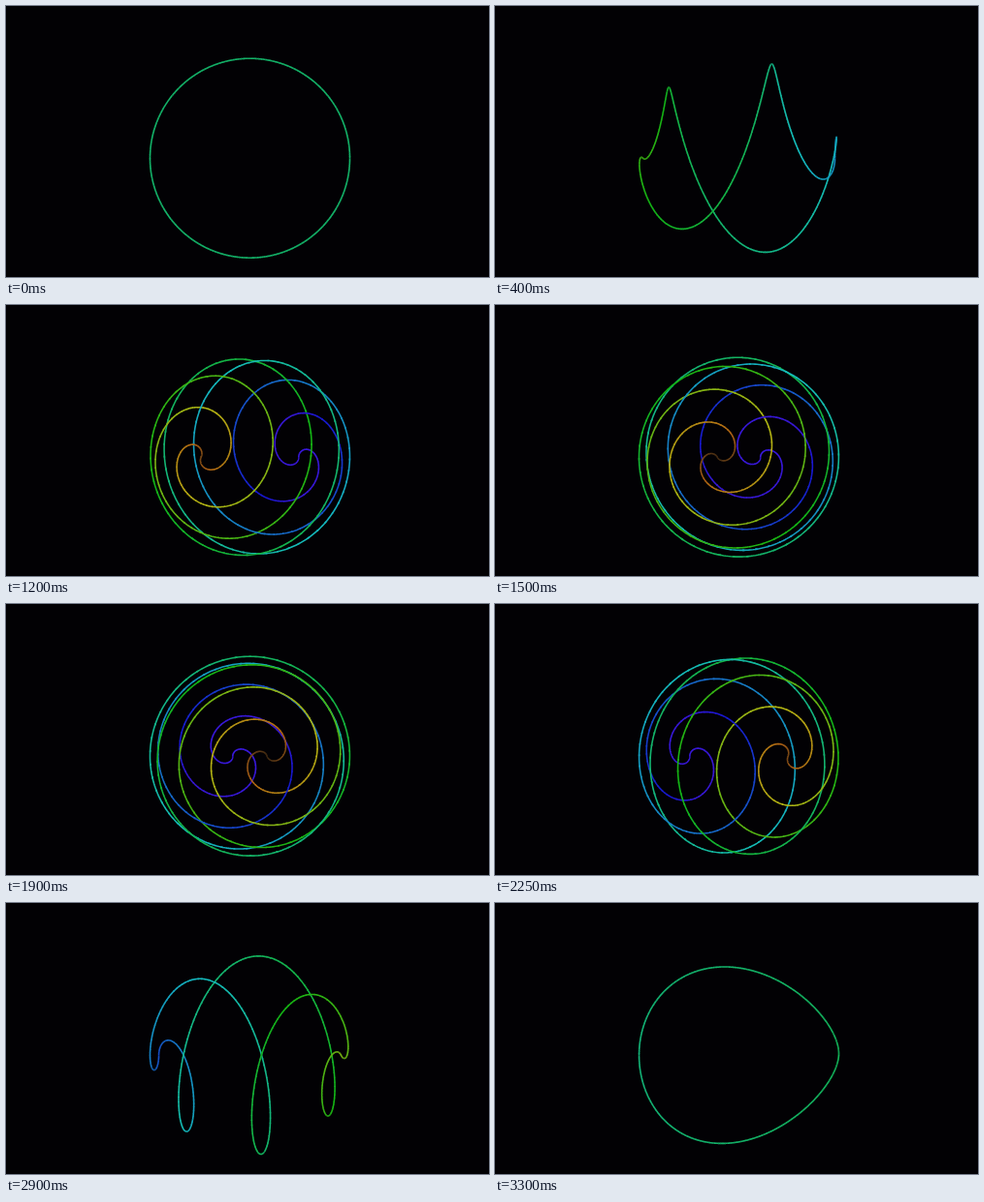
Write an HTML page with a canvas that moves like this. It is 498 by 280 pixels and loops after 3350 ms.

```html
<!DOCTYPE html>
<html lang="en">
<head>
<meta charset="utf-8">
<title>Twisting ring</title>
<style>
  html, body { margin: 0; width: 100%; height: 100%; overflow: hidden; background: #020104; }
  canvas { display: block; width: 498px; height: 280px; }
</style>
</head>
<body>
<canvas id="stage" width="498" height="280"></canvas>
<script>
const ctx = document.getElementById('stage').getContext('2d');

const LOOP = 3350, STEP = 50;
const START = 113, SPAN = 3220;      // the turn begins after a short hold
const CX = 251.5, CY = 157.2, R = 103;
const MAX_TWIST = 8;
const CHUNKS = 180, PARTS = 6;

const clamp = (x, lo, hi) => Math.min(hi, Math.max(lo, x));

// Spectrum along the spiral, h from -1 (orange, fading out) to 1 (indigo)
function colour(h) {
  const hue = clamp(152 + 150 * h, 30, 250);
  const fade = clamp((1.1 + h) / 0.3, 0, 1);
  const light = (39 + 10 * Math.max(0, h)) * fade;
  return `hsl(${hue}, ${40 + 40 * fade}%, ${light}%)`;
}

// One half of a ring, twisted about its axis and then turned by `turn`
function point(v, side, twist, turn) {
  const r = side * Math.sin(v);
  const x = Math.cos(v) * Math.cos(turn) + r * Math.sin(twist * v) * Math.sin(turn);
  return [CX + R * x, CY - R * r * Math.cos(twist * v)];
}

function draw(time) {
  const p = clamp((time - START) / SPAN, 0, 1);
  const twist = MAX_TWIST * 4 * p * (1 - p);
  const turn = Math.PI * p;

  ctx.fillStyle = '#020104';
  ctx.fillRect(0, 0, 498, 280);
  ctx.lineWidth = 1.6;
  ctx.lineJoin = 'round';

  for (const side of [1, -1]) {
    for (let c = 0; c < CHUNKS; c++) {
      ctx.strokeStyle = colour(twist / MAX_TWIST * (1 - 2 * (c + 0.5) / CHUNKS));
      ctx.beginPath();
      // One extra part overlaps the next chunk and hides the seam
      for (let k = 0; k <= PARTS + 1; k++) {
        const v = Math.PI * (c + k / PARTS) / CHUNKS;
        ctx.lineTo(...point(v, side, twist, turn));
      }
      ctx.stroke();
    }
  }
}

const origin = performance.now();
let last = -1;

function tick() {
  const t = Math.max(0, performance.now() - origin) % LOOP;
  const step = Math.floor(t / STEP + 0.001);
  if (step !== last) {
    draw(step * STEP);
    last = step;
  }
  requestAnimationFrame(tick);
}

tick();
</script>
</body>
</html>
```
